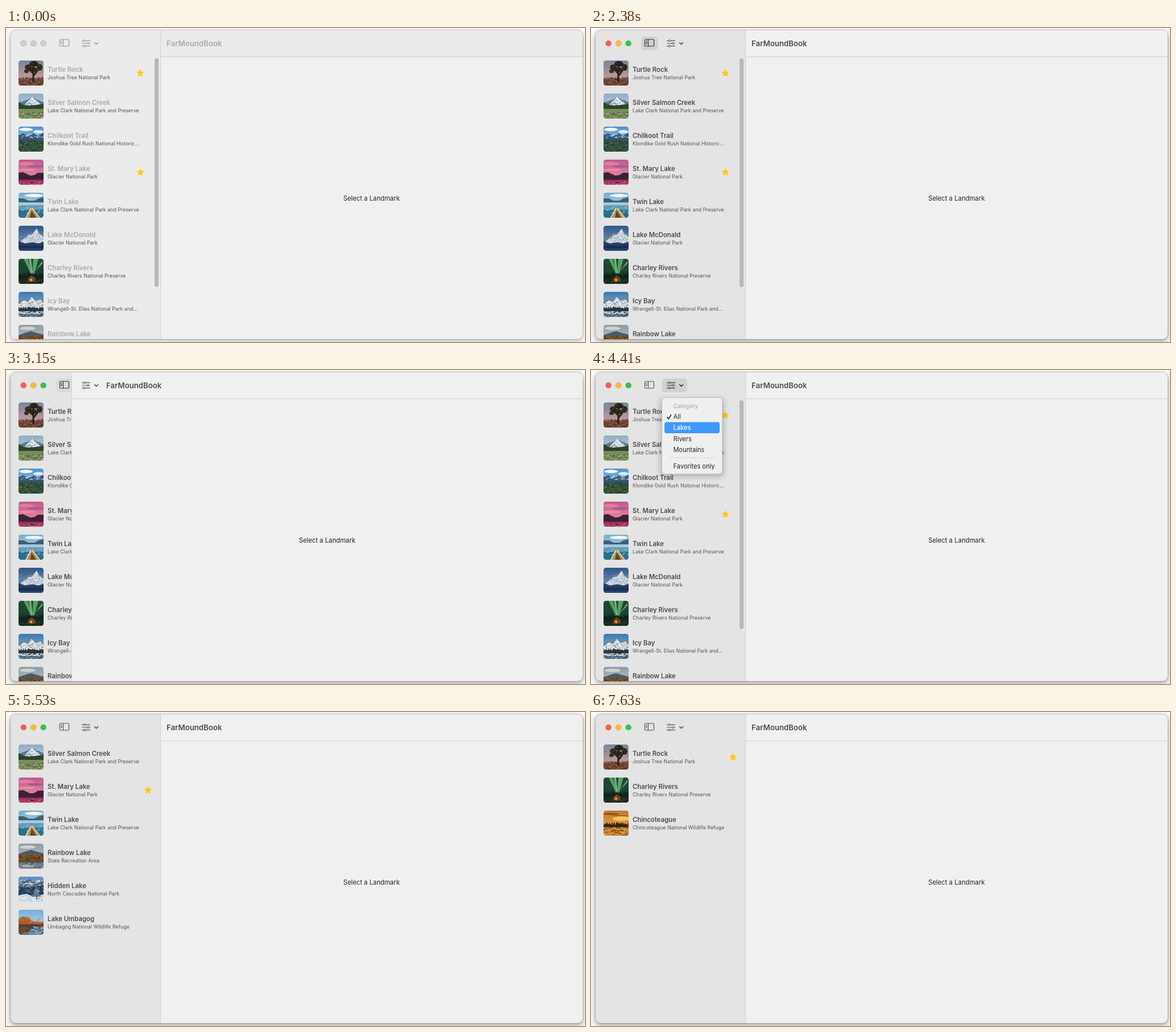
These frames come from a looping animation (1017x551 px, 8000 ms). An HTML page:

```html
<!DOCTYPE html>
<html lang="en">
<head>
<meta charset="utf-8">
<style>
  html, body { margin: 0; width: 100%; height: 100%; overflow: hidden; background: #fafafa; }
  svg { display: block; font: 11.3px Inter, "Open Sans", sans-serif; }
  .name { font-size: 11.35px; font-weight: 600; }
  .park { font-size: 8.9px; fill: #555; }
  .title { font-size: 13.2px; font-weight: 600; }
  .head { font-size: 9.7px; font-weight: 600; fill: #b4b4b4; }
  .item { font-size: 11.05px; fill: #222; }
  .item.on { fill: #fff; font-weight: 500; }
  .icon { fill: none; stroke-width: 1.2; stroke-linecap: round; stroke-linejoin: round; }
</style>
</head>
<body>
<svg width="1017" height="551" viewBox="0 0 1017 551">
  <defs id="defs">
    <clipPath id="window"><rect x="8" y="4" width="1005" height="542" rx="9"/></clipPath>
    <clipPath id="thumb"><rect width="44" height="44" rx="4.5"/></clipPath>
    <filter id="soft" x="-30%" y="-30%" width="160%" height="160%"><feGaussianBlur stdDeviation="5"/></filter>
    <filter id="haze"><feGaussianBlur stdDeviation=".55"/></filter>
    <path id="star" fill="#fdca12" stroke="#fdca12" stroke-width="1.2" stroke-linejoin="round"/>
  </defs>
  <g id="scene"></g>
</svg>
<script>
const LOOP = 8000, STEP = 70, OPEN = 272, LEFT = 8, ROW = 58;
const $ = id => document.getElementById(id);
const mix = (a, b, p) => a + (b - a) * p;
const rand = n => { const s = Math.sin(n * 127.1) * 43758.5; return s - Math.floor(s); };
const ease = (t, from, to) => {
  const p = Math.min(1, Math.max(0, (t - from) / (to - from)));
  return p * p * (3 - 2 * p);
};

// Shapes for the 44 px landscape pictures
const hill = (color, points) => `<polygon fill="${color}" points="0,44 ${points} 44,44"/>`;
const band = (color, y, h) => `<rect fill="${color}" y="${y}" width="44" height="${h}"/>`;
const blob = (color, x, y, rx, ry = rx) => `<ellipse fill="${color}" cx="${x}" cy="${y}" rx="${rx}" ry="${ry}"/>`;
const trees = (color, y, height) => hill(color, Array.from({ length: 31 },
  (_, i) => `${i * 1.5},${(y - height * rand(i + y)).toFixed(1)}`).join(' '));
const dots = (color, n, y, h, size = 1.4) => `<path fill="${color}" d="${Array.from({ length: n },
  (_, i) => `M${(rand(i + y) * 44).toFixed(1)} ${(y + rand(i * 3 + n) * h).toFixed(1)}h${size}v1h-${size}z`).join('')}"/>`;
let photoCount = 0;
const photo = (top, bottom, ...layers) => {
  const id = 'photo' + photoCount++;
  $('defs').insertAdjacentHTML('beforeend',
    `<linearGradient id="${id}sky" x2="0" y2="1"><stop stop-color="${top}"/><stop offset="1" stop-color="${bottom}"/></linearGradient>
     <g id="${id}" clip-path="url(#thumb)"><rect width="44" height="44" fill="url(#${id}sky)"/><g filter="url(#haze)">${layers.join('')}</g></g>`);
  return id;
};

const place = (name, park, picture, star = false) => ({ name, park, picture, star });
const clark = 'Lake Clark National Park and Preserve', glacier = 'Glacier National Park';
const turtle = place('Turtle Rock', 'Joshua Tree National Park', photo('#75879f', '#e0a09c',
  trees('#6b4534', 33, 5), dots('#b0795c', 60, 31, 13), dots('#33241c', 30, 32, 12, 2),
  '<path d="M26 38V23L17 14M27 26L36 14M26 22V10" fill="none" stroke="#2a2118" stroke-width="3"/>',
  blob('#2e291c', 17, 12, 6, 5), blob('#252116', 27, 6, 8, 5), blob('#2e291c', 37, 12, 5, 6),
  blob('#272316', 25, 16, 10, 4), blob('#2e291c', 14, 19, 4, 3), dots('#73643d', 30, 3, 17)), true);
const salmon = place('Silver Salmon Creek', clark, photo('#8fadc6', '#dfe6e8',
  hill('#5e7688', '0,17 9,13 18,10 24,5 32,11 44,15'), hill('#dfe6ea', '13,16 19,11 24,5 29,11 35,14 38,18'),
  dots('#5f7585', 45, 11, 10, 2), hill('#2d4433', '0,15 9,20 18,21 30,20 44,18'), trees('#2b4231', 25, 4), band('#7c8d54', 27, 17),
  band('#8c9a91', 34, 3), dots('#35462a', 50, 32, 11, 2), dots('#c9c896', 30, 36, 8)));
const chilkoot = place('Chilkoot Trail', 'Klondike Gold Rush National Historic...', photo('#4e94cf', '#c6dfef',
  blob('#f0f5f7', 13, 5, 12, 3), blob('#dceaf4', 35, 9, 9, 3), hill('#365678', '0,14 9,12 17,17 26,12 34,16 44,11'),
  dots('#dde8ed', 24, 13, 6, 2.5), trees('#304f3b', 27, 6), dots('#7a9148', 70, 25, 19), dots('#172d25', 55, 24, 20, 2)));
const mary = place('St. Mary Lake', glacier, photo('#bd5a8e', '#f39aa4',
  blob('#e77b9d', 12, 7, 15, 3), blob('#9d5e91', 31, 12, 16, 2), blob('#f08ca3', 15, 18, 15, 2),
  hill('#3a2038', '0,23 8,22 14,25 21,28 28,27 34,23 44,23'), band('#a2345c', 35, 9),
  band('#60243f', 34, 2), dots('#d6668a', 15, 38, 6, 4), blob('#25162b', 24, 40, 3, 1)), true);
const twin = place('Twin Lake', clark, photo('#72aed1', '#e5edef',
  blob('#f2f3ef', 27, 5, 16, 3), hill('#3f6072', '0,10 9,10 18,14 28,14 35,10 44,8'),
  band('#a9c9d9', 17, 5), band('#659bb8', 22, 8), band('#28718f', 30, 14), dots('#a5d0df', 18, 20, 16, 4),
  '<path d="M14 44L22 27L24 27L38 44" fill="#b89157"/><path d="M20 44L23 31L31 44" fill="#59483a"/><path d="M13 44L22 27M37 44L24 27" stroke="#eed398" stroke-width="2"/>'));
const mcdonald = place('Lake McDonald', glacier, photo('#315786', '#83a6c9',
  hill('#5f7691', '0,25 9,21 17,14 24,13 32,5 38,14 44,10'), hill('#d4dbe1', '0,30 17,17 24,15 32,5 36,14 44,19 44,29'),
  dots('#8193a6', 75, 12, 17, 2), hill('#263e64', '0,27 12,31 25,29 35,31 44,28'),
  trees('#1c2f50', 37, 4), band('#24436f', 40, 4)));
const charley = place('Charley Rivers', 'Charley Rivers National Preserve', photo('#1f4a33', '#183b2b',
  '<path d="M22 27L9 0H16L24 25L26 0H35L27 29Z" fill="#63b777" opacity=".8"/><path d="M23 28L18 0H22L25 27L42 4V8Z" fill="#a1dfa0" opacity=".7"/>',
  trees('#0d231c', 31, 9), band('#18291d', 34, 10), '<path d="M17 34L23 29L30 34V40H17Z" fill="#7b3f1d"/><path d="M20 35H24V39H20" fill="#f19c3c"/>',
  dots('#496044', 25, 37, 7)));
const icy = place('Icy Bay', 'Wrangell-St. Elias National Park and...', photo('#3c79b0', '#a9cbe0',
  hill('#6a8295', '0,17 9,13 15,14 23,9 31,13 38,11 44,16'), hill('#e2e8e9', '0,22 9,15 17,17 23,9 30,16 38,13 44,20'),
  dots('#6f8496', 65, 12, 14, 2), trees('#27333d', 30, 5), band('#c3cdd3', 34, 5),
  dots('#2f3f4c', 60, 29, 10, 2.5), band('#45637c', 39, 5), dots('#a9bcc9', 20, 37, 7, 2)));
const rainbow = place('Rainbow Lake', 'State Recreation Area', photo('#8b9caa', '#d7d4ca',
  blob('#d1d1cb', 16, 6, 14, 3), hill('#4d5964', '0,18 11,14 22,11 32,14 44,17'), trees('#805525', 22, 5),
  dots('#322e20', 60, 20, 9, 2), band('#5d4c36', 29, 4), band('#768491', 33, 11),
  blob('#a9adad', 15, 39, 12, 2), dots('#534a3e', 25, 29, 13, 4)));
const hidden = place('Hidden Lake', 'North Cascades National Park', photo('#608dbb', '#b9d3e6',
  hill('#4f657e', '0,10 9,8 20,4 31,12 44,6'), dots('#e9eff3', 45, 6, 12, 3), hill('#253f5f', '0,18 13,20 30,17 44,15'),
  hill('#dce5ec', '0,33 14,30 26,35 44,31'), dots('#879bae', 35, 31, 13, 2),
  '<path d="M32 40V14M32 18L27 26H37M32 24L25 34H39" stroke="#5f6d7c" fill="#6f7d8b" stroke-width="2"/>', dots('#dce4e9', 25, 19, 16)));
const chincoteague = place('Chincoteague', 'Chincoteague National Wildlife Refuge', photo('#c7762b', '#f1b648',
  blob('#7a4a2d', 12, 6, 16, 1.4), blob('#f6c45c', 31, 14, 15, 4), blob('#9b5a29', 30, 9, 14, 1),
  trees('#372318', 26, 7), band('#c98431', 29, 15), dots('#623a1c', 60, 28, 15, 4), dots('#f4bb50', 35, 30, 13, 3)));
const umbagog = place('Lake Umbagog', 'Umbagog National Wildlife Refuge', photo('#73afdb', '#d2e5ef',
  hill('#aa5e2b', '0,16 7,12 17,13 23,20 44,22 44,28 0,28'), dots('#e08236', 40, 13, 12, 2), trees('#5b3a27', 27, 3),
  band('#789bb5', 29, 15), hill('#6c4b35', '0,29 26,29 18,39 0,42'), dots('#35383a', 50, 27, 15, 3)));

const all = [turtle, salmon, chilkoot, mary, twin, mcdonald, charley, icy, rainbow, hidden, chincoteague, umbagog];
const lakes = [salmon, mary, twin, rainbow, hidden, umbagog];
const rivers = [turtle, charley, chincoteague];

$('star').setAttribute('d', 'M' + Array.from({ length: 10 }, (_, i) => {
  const r = i % 2 ? 2.6 : 6.2, a = (i * 36 - 90) * Math.PI / 180;
  return `${(r * Math.cos(a)).toFixed(2)} ${(r * Math.sin(a)).toFixed(2)}`;
}).join('L') + 'Z');

const rect = (x, y, w, h, fill, rx = 0, more = '') =>
  `<rect x="${x}" y="${y}" width="${Math.max(0, w)}" height="${h}" rx="${rx}" fill="${fill}" ${more}/>`;
const text = (x, y, s, cls = '', more = '') => `<text x="${x}" y="${y}" class="${cls}" ${more}>${s}</text>`;
const line = (d, color, more = '') => `<path class="icon" d="${d}" stroke="${color}" ${more}/>`;

function row(item, y, alpha, starX, ink) {
  return `<g transform="translate(0 ${y})" opacity="${alpha}">
    <use href="#${item.picture}" x="22"/>
    ${text(73, 20.3, item.name, 'name', `fill="${ink}"`)}${text(73, 33.2, item.park, 'park')}
    ${item.star ? `<use href="#star" x="${starX}" y="22.3"/>` : ''}</g>`;
}

function list(t, ink) {
  const first = t < 7420;
  const [from, to, p] = first ? [all, lakes, ease(t, 5320, 5530)] : [lakes, rivers, ease(t, 7420, 7630)];
  const starX = first ? mix(236, 249.5, p) : 249.5;
  const rows = all.map(item => {
    const a = from.indexOf(item), b = to.indexOf(item);
    if (a < 0 && b < 0) return '';
    const pos = a < 0 ? b : b < 0 ? a : mix(a, b, p);
    return row(item, 57 + ROW * pos, a < 0 ? p : b < 0 ? 1 - p : 1, starX, ink);
  }).join('');
  const bar = first ? rect(261, 53, 7, 401.5, '#b8b8b8', 3.5, `opacity="${1 - p}"`) : '';
  return rows + bar;
}

// Menu row under the pointer, by start time
const picks = [[0, -1], [4340, 0], [4410, 1], [5040, -1], [5110, 1], [6160, -1],
  [6580, 0], [6650, 1], [6720, 2], [7140, -1], [7210, 2]];

function menu(t) {
  const alpha = t >= 3850 && t < 6000 ? 1 - ease(t, 5150, 5320) : t >= 6160 ? 1 - ease(t, 7250, 7390) : 0;
  if (!alpha) return '';
  const pick = picks.filter(([at]) => at <= t).pop()[1], checked = t < 6000 ? 0 : 1;
  const items = ['All', 'Lakes', 'Rivers', 'Mountains'].map((s, i) => {
    const y = 82 + 19.4 * i, on = i === pick;
    return (on ? rect(129, y - 9.8, 97, 19.4, '#4098fb', 3.5) : '')
      + (i === checked ? line(`M134 ${y + .8}l2.3 3 4.2-7`, on ? '#fff' : '#222', 'style="stroke-width:1.6"') : '')
      + text(144.6, y + 4, s, on ? 'item on' : 'item');
  }).join('');
  return `<g opacity="${alpha}">${rect(121, 50, 113, 138, '#000', 8, 'opacity=".2" filter="url(#soft)"')}
    ${rect(124.5, 48.5, 106, 134, '#efefef', 5.5, 'stroke="#c2c2c2"')}
    ${text(144.6, 66.8, 'Category', 'head')}${items}
    ${rect(136, 153.5, 82, 1, '#d9d9d9')}${text(144.6, 172.9, 'Favorites only', 'item')}</g>`;
}

function draw(t) {
  const active = t >= 2380;
  const edge = Math.round(mix(LEFT, OPEN, 1 - ease(t, 2415, 2695) + ease(t, 3027, 3307)));
  const ink = active ? '#4c4c4c' : '#aaa', icon = active ? '#555' : '#999';
  const pressed = (t >= 2380 && t < 2660) || (t >= 2940 && t < 3360);
  const filtering = (t >= 3570 && t < 5390) || (t >= 6160 && t < 7490);
  const toggleInk = pressed ? '#333' : !active && t >= 1680 ? '#8a8a8a' : icon;
  const toggle = pressed ? rect(88, 15, 29, 24, edge < OPEN ? '#dadada' : '#d1d1d1', 5) : '';
  const lights = (active ? ['#fc5b53', '#fdbc30', '#33c748'] : Array(3).fill('#cecece')).map((c, i) =>
    `<circle cx="${30.7 + 17.5 * i}" cy="27" r="5.1" fill="${c}" stroke="#000" stroke-opacity="${active ? .1 : .16}"/>`).join('');
  const filterInk = filtering ? '#333' : icon;
  const knobs = [[138, 22.3], [144, 27], [138, 31.7]].map(([x, y]) =>
    `<circle cx="${x}" cy="${y}" r="1.6" fill="#e8e8e8" stroke="${filterInk}"/>`).join('');

  $('scene').innerHTML = `
    ${rect(7, 7, 1007, 544, '#000', 10, `opacity="${active ? .3 : .2}" filter="url(#soft)"`)}
    <g clip-path="url(#window)">
      ${rect(8, 4, 264, 542, active ? '#e4e4e4' : '#ebebeb')}
      ${list(t, ink)}
      ${edge > 100 ? toggle : ''}
      ${rect(edge, 4, 1013 - edge, 542, '#f0f0f0')}
      ${rect(edge, 4, 1013 - edge, 46, active ? '#f0f0f0' : '#ebebeb')}
      ${rect(edge, 50, 1013 - edge, 1, '#cfcfcf')}
      ${rect(edge - 1, 4, 1, 542, '#d3d3d3')}
      ${edge > 100 ? '' : toggle}
      ${filtering ? rect(125, 15, 44, 24, '#d1d1d1', 5) : ''}
      ${lights}
      ${line('M96 20h13q1.5 0 1.5 1.5v9q0 1.5-1.5 1.5h-13q-1.5 0-1.5-1.5v-9q0-1.5 1.5-1.5zM100.5 20v12M96.7 23h1.5M96.7 25.2h1.5M96.7 27.4h1.5', toggleInk)}
      ${line('M133.5 22.3h14M133.5 27h14M133.5 31.7h14', filterInk)}${knobs}
      ${line('M155.6 25.7l3 2.9 3-2.9', filterInk, 'style="stroke-width:1.6"')}
      ${text(Math.max(176, edge + 10), 31.7, 'FarMoundBook', 'title', `fill="${ink}"`)}
      ${text((edge + 1011) / 2 + .5, 302.9, 'Select a Landmark', '', 'text-anchor="middle" fill="#222"')}
    </g>
    ${rect(7.5, 3.5, 1006, 543, 'none', 9.5, 'stroke="#000" stroke-opacity=".18"')}
    ${menu(t)}`;
}

// The picture advances in even steps, as a screen recording does
let shown = -1;
function tick() {
  const t = Math.floor(performance.now() % LOOP / STEP) * STEP;
  if (t !== shown) draw(shown = t);
  requestAnimationFrame(tick);
}
tick();
</script>
</body>
</html>
```
